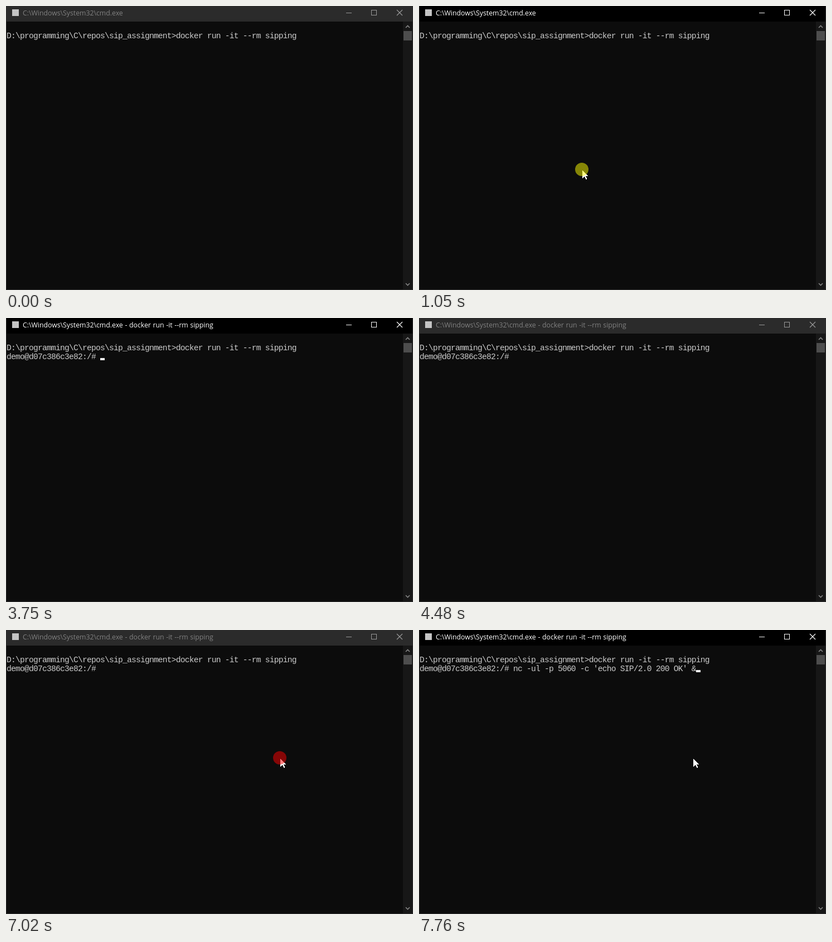
An HTML page that plays this animation: 730 px wide and 511 px high, repeating every 8 s.

```html
<!DOCTYPE html>
<html lang="en">
<head>
<meta charset="utf-8">
<title>Terminal session</title>
<style>
  html, body { margin: 0; width: 100%; height: 100%; overflow: hidden; background: #0c0c0c; }
  svg { display: block; width: 730px; height: 511px; }
  text { white-space: pre; }
  .console { font: 14.6px "Liberation Mono", monospace; letter-spacing: calc(8px - .6001em); fill: #ccc; }
  .caption { font: 12.27px "Open Sans", sans-serif; word-spacing: .5px; }
  .buttons { fill: none; stroke-width: 1; }
  .arrows { fill: none; stroke: #858585; stroke-width: 1.6; }
</style>
</head>
<body>
<svg viewBox="0 0 730 511">
  <rect width="730" height="511" fill="#0c0c0c"/>
  <rect id="bar" x="1" width="728" height="28"/>
  <path d="M.5 0V510.5H729.5V0" fill="none" stroke="#2e2e2e"/>
  <rect x="11" y="6" width="12" height="12" fill="#c4c4c4"/>
  <text id="caption" class="caption" x="30" y="17"></text>
  <g id="buttons" class="buttons">
    <path d="M610 12.5H620M655.5 7.5H664.5V16.5H655.5Z" shape-rendering="crispEdges"/>
    <path d="M701 7L711 17M711 7L701 17" stroke-width="1.2"/>
  </g>
  <rect x="712" y="28" width="17" height="482" fill="#171717"/>
  <rect x="713" y="45" width="15" height="17" fill="#4d4d4d"/>
  <path class="arrows" d="M717 39L720.5 35.5L724 39M717 499L720.5 502.5L724 499"/>
  <text class="console" x="1" y="57.5">D:\programming\C\repos\sip_assignment&gt;docker run -it --rm sipping</text>
  <text id="shell" class="console" x="1" y="73.5"></text>
  <rect id="caret" width="8" height="4" fill="#f2f2f2"/>
  <g id="mouse">
    <path d="M0 0H.8L10.4 9.6V10H6.2L8.4 15V16H6.4L4 11H3L0 14Z" fill="#fff" shape-rendering="crispEdges"/>
    <circle id="click" cx="-1" cy="-2" r="12" opacity=".5"/>
  </g>
</svg>
<script>
const LOOP = 8000;
const PATH = 'C:\\Windows\\System32\\cmd.exe';
const RUNNING = PATH + ' - docker run -it --rm sipping';
const PROMPT = 'demo@d07c386c3e82:/# ';
const COMMAND = "nc -ul -p 5060 -c 'echo SIP/2.0 200 OK' &";
const LEFT = '#ff0', RIGHT = '#f00';

const initial = { active: false, caption: PATH, shell: '', caret: null, mouse: null, click: null };

// Each step holds only what changes; caret is [column, row].
const steps = [
  [190, { mouse: [504, 417] }],
  [260, { mouse: [360, 328] }],
  [330, { mouse: [293, 296] }],
  [990, { click: LEFT }],
  [1050, { active: true }],
  [1120, { click: null }],
  [1540, { caret: [65, 0] }],
  [2000, { caption: RUNNING, caret: [0, 1] }],
  [2070, { caret: null }],
  [2600, { caret: [0, 1] }],
  [3080, { mouse: null }],
  [3150, { caret: null }],
  [3680, { caret: [0, 1] }],
  [3750, { shell: PROMPT, caret: [21, 1] }],
  [4480, { active: false, caret: null }],
  [6220, { mouse: [560, 160] }],
  [6290, { mouse: null }],
  [6490, { mouse: [506, 232] }],
  [6560, { mouse: [500, 232] }],
  [6620, { mouse: [495, 232] }],
  [6690, { mouse: [492, 232] }],
  [7020, { click: RIGHT }],
  [7090, { active: true }],
  [7220, { click: null }],
  [7620, { click: RIGHT, caret: [21, 1] }],
  [7690, { shell: PROMPT + COMMAND, caret: [62, 1] }],
  [7760, { click: null }]
];

const el = id => document.getElementById(id);
const set = (id, name, value) => el(id).setAttribute(name, value);
const show = (id, on) => set(id, 'visibility', on ? 'visible' : 'hidden');

function stateAt(time) {
  const past = steps.filter(([start]) => start <= time);
  return Object.assign({}, initial, ...past.map(([, change]) => change));
}

function draw({ active, caption, shell, caret, mouse, click }) {
  set('bar', 'fill', active ? '#000' : '#2b2b2b');
  set('caption', 'fill', active ? '#fff' : '#808080');
  set('buttons', 'stroke', active ? '#fff' : '#999');
  el('caption').textContent = caption;
  el('shell').textContent = shell;
  show('caret', caret);
  if (caret) {
    set('caret', 'x', 1 + caret[0] * 8);
    set('caret', 'y', 56 + caret[1] * 16);
  }
  show('mouse', mouse);
  if (mouse) set('mouse', 'transform', `translate(${mouse})`);
  show('click', mouse && click);
  if (click) set('click', 'fill', click);
}

const begin = performance.now();
function tick() {
  draw(stateAt((performance.now() - begin) % LOOP));
  requestAnimationFrame(tick);
}
tick();
</script>
</body>
</html>
```
